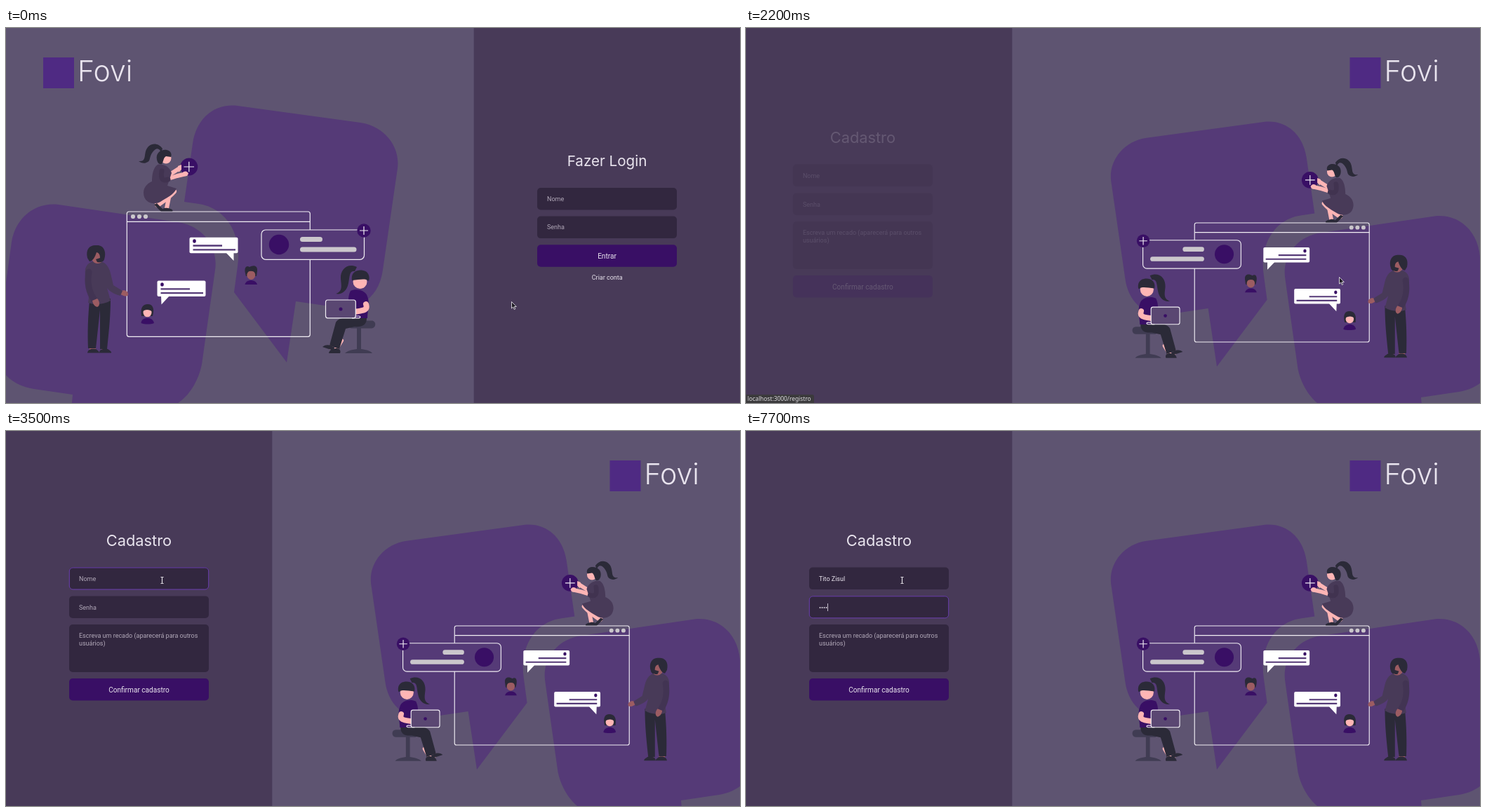
An HTML page for the animation above (8000 ms loop, 1046x535 px).

```html
<!DOCTYPE html>
<html lang="pt">
<head>
<meta charset="utf-8">
<title>Cadastro</title>
<style>
html, body { margin: 0; width: 100%; height: 100%; overflow: hidden; background: #5e5471; }
svg { display: block; width: 1046px; height: 535px; }
text { font: 9px Roboto, sans-serif; fill: #e9e4ee; }
.brand { font: 300 41px Inter, sans-serif; }
.title { font-family: Inter, sans-serif; text-anchor: middle; }
.mid { text-anchor: middle; }
.big { font-size: 10.1px; }
.hint { fill: #b2a9b9; }
.field { fill: #32273f; }
.panel { fill: #483a58; }
.deep { fill: #390f65; }
.bub { fill: #553a77; }
.dark { fill: #2b2a38; }
.cloth { fill: #483a58; }
.pink { fill: #ffb5b5; }
.brown { fill: #9c5c62; }
.grey { fill: #cbc7cc; }
.stool { fill: #403c53; }
.line { fill: none; stroke: #f1eef4; stroke-width: 1.2; }
.limb { fill: none; stroke-linecap: round; stroke-linejoin: round; }
</style>
</head>
<body>
<svg viewBox="0 0 1046 535">
<defs>
  <g id="logo">
    <rect x="53" y="42" width="44" height="44" fill="#4f2a83"/>
    <text class="brand" x="102" y="76">Fovi</text>
  </g>

  <g id="note">
    <rect width="69" height="22.5" rx="2" fill="#fff"/>
    <ellipse cx="7" cy="5.3" rx="2.3" ry="2.7" class="deep"/>
    <path d="M5 11.8H46.5M5 17.6H65.5" stroke="#553a77" stroke-width="2.3"/>
  </g>

  <g id="scene">
    <path class="bub" d="M254 248L266 165C271 130 296 107 330 111L505 135C540 140 562 170 558 200L537 345C532 383 505 402 475 399L413 390L400 477L325 377L330 340C337 290 310 256 275 251Z"/>
    <path class="bub" d="M95 523L40 515C5 510-18 485-12 450L8 305C14 270 42 248 75 252L245 277C280 282 303 312 298 345L279 480C272 515 245 550 205 545H93Z"/>

    <!-- window -->
    <rect class="line" x="172.3" y="262" width="261" height="178.3" rx="3"/>
    <path class="line" d="M172 276.3H433"/>
    <g class="grey"><circle cx="181" cy="269" r="3.1"/><circle cx="190" cy="269" r="3.1"/><circle cx="199" cy="269" r="3.1"/></g>
    <use href="#note" x="261.5" y="298.7"/>
    <path fill="#fff" d="M313 320L324.5 332V320Z"/>
    <use href="#note" x="215.5" y="360.6"/>
    <path fill="#fff" d="M221 382L221.5 394.5L233 382Z"/>

    <!-- contact card -->
    <rect class="line" x="364" y="288" width="146.5" height="42.3" rx="6" style="fill:#553a77"/>
    <circle class="deep" cx="389" cy="309" r="14.2"/>
    <g class="grey"><rect x="419" y="298" width="32" height="7" rx="3.5"/><rect x="419" y="312.5" width="80.5" height="7" rx="3.5"/></g>
    <circle class="deep" cx="510" cy="289" r="9.7"/>
    <path class="line" d="M504 289H516M510 283V295"/>

    <!-- avatars -->
    <path class="deep" d="M340.5 366C342 358 356 358 358 366Z"/>
    <path class="dark" d="M341 350C339 341 343 338 347 341C352 338 359 338 358 347L357 354H342Z"/>
    <ellipse class="brown" cx="349.3" cy="352.5" rx="6" ry="6.5"/>
    <path class="dark" d="M342 349V343H357V350C353 346 346 346 342 349Z"/>
    <path class="deep" d="M192.5 421C193 412 209 411 211 421C206 423 198 423 192.5 421Z"/>
    <path class="dark" d="M193 411C191 399 195 394 202 394C209 394 212 400 209 411Z"/>
    <ellipse class="pink" cx="201.5" cy="406" rx="6" ry="6.3"/>
    <path class="dark" d="M194 405C195 397 208 396 209 405C204 401 198 401 194 405Z"/>

    <!-- standing man -->
    <path class="brown" d="M119 453H128V460H119ZM136 453H144V460H136Z"/>
    <path class="dark" d="M117 389L149 386C149 410 147 430 144 458H134L134 402L128 457H117C116 432 117 410 119 389Z"/>
    <path class="dark" d="M116 463.5C117 458 122 457 128 458C131 460 133 462 133 463.5ZM133 463.5C133 458 139 457 145 458C148 460 151 462 150 463.5Z"/>
    <path class="brown" d="M164 375C169 373 175 376 174 381C171 385 165 381 162 379Z"/>
    <path class="cloth" d="M127 332C138 331 146 337 149 350L153 367L166 375L163 382C154 380 147 375 144 371L149 389C139 395 125 395 117 392C121 378 111 360 113 344C115 336 121 333 127 332Z"/>
    <path class="limb" d="M118 348C115 365 118 377 126 388" stroke="#423453" stroke-width="9"/>
    <path class="brown" d="M123 389L130 386C134 390 134 397 130 398C126 397 124 394 123 389Z"/>
    <ellipse class="brown" cx="130.5" cy="325" rx="9.5" ry="11"/>
    <path class="dark" d="M116 328C113 315 120 309 129 310C138 309 144 318 140 330C139 334 134 335 130 334L128 330L134 328C134 324 133 321 129 320C127 327 123 333 119 333Z"/>

    <!-- crouching woman -->
    <g class="limb" stroke="#ffb5b5">
      <path d="M239 233C231 242 224 246 216 252" stroke-width="8"/>
      <path d="M232 242L229 257" stroke-width="6"/>
      <path d="M228 216L244 211L257 208" stroke-width="6"/>
      <path d="M235 208L249 199" stroke-width="6"/>
    </g>
    <path class="dark" d="M211 252L215 250L224 259C225 262 222 262 220 261ZM222 261.5C222 257 227 256 231 257C236 258 239 260 237 261.5Z"/>
    <path class="cloth" d="M216 195C225 193 234 199 236 207L230 225L243 229C239 238 229 242 220 248C211 253 196 250 196 235C196 225 205 220 208 219C208 209 210 199 216 195Z"/>
    <path class="limb" d="M222 204C220 215 223 219 231 216" stroke="#413350" stroke-width="7"/>
    <path class="dark" d="M221 178C219 171 214 170 209 177C203 185 207 190 200 192C196 194 192 192 189 190C199 191 197 184 199 176C202 165 215 161 223 172Z"/>
    <ellipse class="pink" cx="228" cy="185.5" rx="7.5" ry="8"/>
    <path class="dark" d="M215 188C213 178 221 173 229 174C234 175 237 179 235 184L228 183C224 185 225 190 222 194C218 195 216 192 215 188Z"/>
    <circle class="deep" cx="260.8" cy="198" r="12.4"/>
    <path class="line" d="M253.5 198H268M260.8 190.7V205.3"/>
    <path class="pink" d="M245 197L250 195V202L246 206ZM251 207C254 203 259 204 260 208C258 212 254 212 250 210Z"/>

    <!-- seated woman -->
    <path class="stool" d="M488 417.5H521C528 417.5 528 428 521 428.5H492C488 428 487 422 488 417.5ZM500 428H506V458C514 459 520 461 522 464H483C486 461 492 459 500 458Z"/>
    <g class="limb" stroke="#ffb5b5" stroke-width="6"><path d="M469 442L463 456M478 446L470 459"/></g>
    <path class="dark" d="M486 414H514C514 424 507 427 497 426L484 429L475 458L461 453L470 420C473 415 479 413 486 414Z"/>
    <path class="dark" d="M451 455C457 450 464 453 468 456L466 460ZM460 464C461 458 467 457 472 457C477 458 477 462 476 464Z"/>
    <path class="deep" d="M491 375C499 371 513 374 515 383C519 393 515 404 515 414H489C492 400 484 389 491 375Z"/>
    <path class="limb" d="M513 394C516 403 509 403 496 405" stroke="#ffb5b5" stroke-width="8"/>
    <path class="dark" d="M497 347C489 346 490 354 488 364C486 376 477 381 470 379C480 376 478 368 477 358C476 343 488 335 500 341Z"/>
    <ellipse class="pink" cx="504.5" cy="362" rx="10" ry="10"/>
    <path class="dark" d="M493 360C491 348 501 344 509 346C516 347 519 354 517 361C512 357 505 359 493 360Z"/>
    <rect class="line" x="455.5" y="388" width="42.8" height="25.8" rx="3" style="fill:#5a4772"/>
    <path class="line" d="M493 413.8H503C505.5 413.5 505.5 411 503 411H498"/>
    <circle class="deep" cx="477" cy="401" r="2.5"/>
  </g>
</defs>

<rect width="1046" height="535" fill="#5e5471"/>

<g id="login">
  <rect class="panel" x="666.7" width="380" height="535"/>
  <use href="#scene"/>
  <use href="#logo"/>
  <text class="title" x="856.5" y="196.7" style="font-size:20.6px">Fazer Login</text>
  <rect class="field" x="757" y="228" width="199" height="31.5" rx="5"/>
  <rect class="field" x="757" y="268.6" width="199" height="31.5" rx="5"/>
  <rect class="deep" x="757" y="309.3" width="199" height="31.5" rx="5"/>
  <text class="hint" x="771" y="246.8">Nome</text>
  <text class="hint" x="771" y="287.4">Senha</text>
  <text class="mid big" x="856.5" y="328.6">Entrar</text>
  <text class="mid" id="create" x="856.7" y="358.8">Criar conta</text>
</g>

<g id="signup">
  <rect class="panel" width="379.3" height="535"/>
  <use href="#scene" transform="translate(1052.6 28) scale(-.954 .954)"/>
  <use href="#logo" x="807.5"/>
  <g id="form">
    <text class="title" x="189.5" y="163.6" style="font-size:21.8px">Cadastro</text>
    <rect class="field" x="90" y="194.6" width="199" height="31.5" rx="5"/>
    <rect class="field" x="90" y="235.4" width="199" height="31.5" rx="5"/>
    <rect class="field" x="90" y="276" width="199" height="68" rx="5"/>
    <rect class="deep" x="90" y="353" width="199" height="31.5" rx="5"/>
    <g fill="none" stroke="#6b3fae">
      <rect id="ring1" x="90.3" y="195" width="198.4" height="31" rx="5"/>
      <rect id="ring2" x="90.3" y="235.8" width="198.4" height="31" rx="5"/>
    </g>
    <text id="name" x="104" y="213.8"></text>
    <text id="pass" x="104" y="254.5"></text>
    <text class="hint" x="104" y="295.3">Escreva um recado (aparecerá para outros</text>
    <text class="hint" x="104" y="306">usuários)</text>
    <text class="mid big" x="189.5" y="372.7">Confirmar cadastro</text>
    <rect id="caret" width=".8" height="11" fill="#e9e4ee"/>
  </g>
</g>

<g id="status">
  <path d="M0 523H94Q97 523 97 526V535H0Z" fill="#3b3a3c"/>
  <text x="2" y="532" style="font:8.4px 'Noto Sans',sans-serif;fill:#dedce0">localhost:3000/registro</text>
</g>

<g id="pointer">
  <path id="arrow" d="M.5.5V10L2.7 8L4.3 11.5L5.8 10.8L4.3 7.5H7.3Z" fill="#1d1a22" stroke="#f4f2f6" stroke-width=".8"/>
  <path id="hand" d="M1 .5Q2.5-.5 3 1V4.5L7 5.5Q8.5 6 8 8L7 11.5H2.5L0 7.5Q-.5 6 1.3 6.5Z" fill="#fff" stroke="#333" stroke-width=".5"/>
  <path id="beam" d="M-2-4.5H-.8L0-4L.8-4.5H2M0-4V4M-2 4.5H-.8L0 4L.8 4.5H2" fill="none" stroke="#e9e6ec" stroke-width="1.1"/>
</g>
</svg>

<script>
const $ = id => document.getElementById(id);
const fade = (id, v) => $(id).setAttribute('opacity', +v);
const clamp = v => Math.max(0, Math.min(1, v));

const LOOP = 8000, STEP = 100, SWAP = 2200, CLICK = 3000, TAB = 6300;
const NAME = 'Tito Zisul';
// [time, characters present]
const nameKeys = [[3600, 1], [3800, 2], [4300, 3], [4400, 4], [4600, 5], [5000, 6], [5400, 7], [5700, 9], [5900, 10]];
const passKeys = [[7000, 1], [7300, 2], [7700, 4]];
// [time, x, y]
const path = [[0, 720, 390], [300, 738, 408], [500, 738, 408], [900, 801, 399], [1000, 801, 399],
  [1600, 845, 355], [2200, 845, 355], [2500, 413, 286], [2800, 236, 219], [3000, 222.5, 213], [LOOP, 222.5, 213]];

// CSS "ease" curve
function ease(x) {
  x = clamp(x);
  const bez = (a, b, u) => 3 * a * u * (1 - u) ** 2 + 3 * b * u * u * (1 - u) + u ** 3;
  let lo = 0, hi = 1;
  for (let i = 0; i < 24; i++) {
    const m = (lo + hi) / 2;
    if (bez(.25, .25, m) < x) lo = m; else hi = m;
  }
  return bez(.1, 1, lo);
}

function pointerAt(t) {
  const i = path.findIndex(k => k[0] > t);
  const [t0, x0, y0] = path[i - 1], [t1, x1, y1] = path[i];
  const p = (t - t0) / (t1 - t0);
  return [x0 + (x1 - x0) * p, y0 + (y1 - y0) * p];
}

const lastKey = (keys, t) => keys.filter(k => k[0] <= t).pop() || [0, 0];

function fill(id, value, hint) {
  $(id).textContent = value || hint;
  $(id).setAttribute('class', value ? '' : 'hint');
}

function draw(t) {
  const late = t >= SWAP;
  $('login').style.display = late ? 'none' : '';
  $('signup').style.display = late ? '' : 'none';
  fade('create', t < 1400 ? 1 : .65);
  fade('status', t < 1800 ? 0 : clamp((2600 - t) / 200));

  const p = ease((t - 2019) / 1250);
  $('form').setAttribute('transform', `translate(${-28 * (1 - p)} 0)`);
  fade('form', p);

  const [nameTime, nameLen] = lastKey(nameKeys, t), [passTime, passLen] = lastKey(passKeys, t);
  fill('name', NAME.slice(0, nameLen), 'Nome');
  fill('pass', '•'.repeat(passLen), 'Senha');

  const moved = clamp((t - TAB + 200) / 200);
  fade('ring1', t < CLICK ? 0 : 1 - moved);
  fade('ring2', moved);

  const second = t >= TAB;
  const since = t - (second ? Math.max(TAB, passTime) : Math.max(CLICK, nameTime));
  const typed = second ? passLen : nameLen;
  const width = typed ? $(second ? 'pass' : 'name').getComputedTextLength() : 0;
  $('caret').setAttribute('x', 104 + width);
  $('caret').setAttribute('y', second ? 246 : 205);
  fade('caret', t >= CLICK && since % 1000 < 500);

  const [x, y] = pointerAt(t);
  $('pointer').setAttribute('transform', `translate(${x} ${y})`);
  const kind = t >= 2800 ? 'beam' : t >= 1400 && !late ? 'hand' : 'arrow';
  for (const id of ['arrow', 'hand', 'beam']) fade(id, id === kind);
}

const start = performance.now();
function tick() {
  const t = (performance.now() - start) % LOOP;
  draw(Math.floor(t / STEP) * STEP);
  requestAnimationFrame(tick);
}
tick();
</script>
</body>
</html>
```
